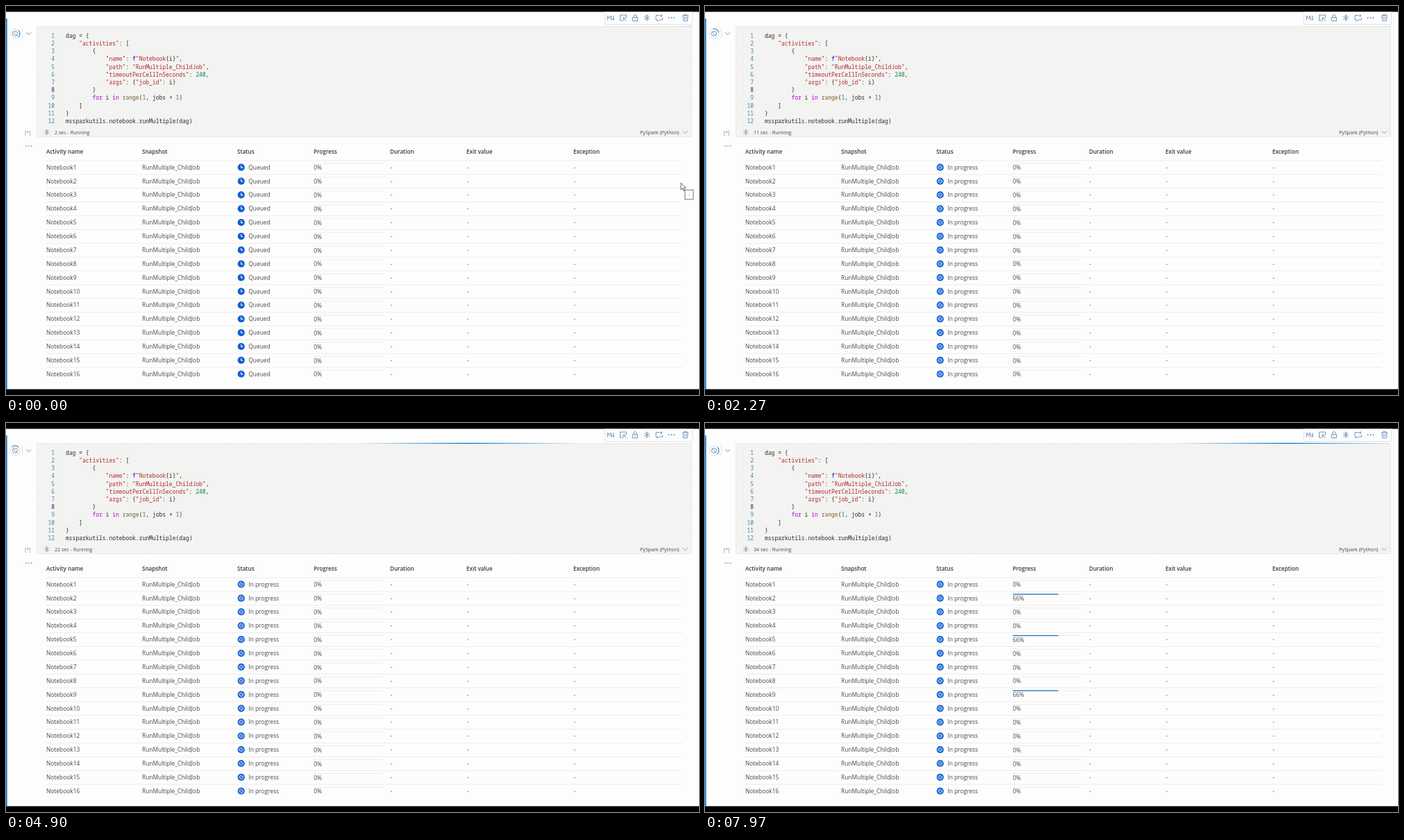
These frames come from a looping animation (998x561 px, 8000 ms). An HTML page:

```html
<!DOCTYPE html>
<html lang="en">
<head>
<meta charset="utf-8">
<title>Notebook run</title>
<style>
  html, body { margin: 0; width: 100%; height: 100%; overflow: hidden; background: #000; }
  svg { display: block; width: 100vw; height: 100vh; }
  text { font: 8.38px "Open Sans", "Noto Sans", sans-serif; fill: #4a4947; white-space: pre; }
  .head { font-size: 8.1px; font-weight: 600; fill: #3b3a39; }
  .small { font-size: 7.15px; }
  .faint { fill: #8a8886; }
  .code { font: 8px "Noto Sans Mono", "DejaVu Sans Mono", monospace; fill: #2a2a2a; }
  .num { fill: #3f86a0; text-anchor: end; }
  .num.current { fill: #0b216f; }
  .str { fill: #ab2a2a; }
  .kw { fill: #af00db; }
  .fn { fill: #795e26; }
  .lit { fill: #098658; }
  .pre { fill: #0000ff; }
  .icon { fill: none; stroke: #5f83ab; stroke-width: .85; }
  .grey { fill: none; stroke: #888; stroke-width: .8; }
</style>
</head>
<body>
<svg id="stage" viewBox="0 0 998 561" preserveAspectRatio="none">
  <defs>
    <linearGradient id="glow">
      <stop offset="0" stop-color="#0078d4" stop-opacity="0"/>
      <stop offset=".5" stop-color="#0078d4"/>
      <stop offset="1" stop-color="#0078d4" stop-opacity="0"/>
    </linearGradient>
    <clipPath id="cellTop"><rect x="44" y="28" width="944" height="3"/></clipPath>
    <g id="queuedIcon">
      <circle r="5.1" fill="#1160d0"/>
      <path d="M0-3V.4H2.6" fill="none" stroke="#fff" stroke-width="1.1"/>
    </g>
    <g id="activeIcon">
      <circle r="5.1" fill="#1160d0"/>
      <path d="M-1.7 2.2A2.8 2.8 0 0 1 .8-2.7M1.7-2.2A2.8 2.8 0 0 1-.8 2.7" fill="none" stroke="#fff" stroke-width=".9"/>
      <path d="M-.6-1.2H1V.4M.6 1.2H-1V-.4" fill="none" stroke="#fff" stroke-width=".5"/>
    </g>
    <path id="star" d="M0-4.5V4.5M-3.9-2.25L3.9 2.25M-3.9 2.25L3.9-2.25M-1.5-3.7L0-2.4L1.5-3.7M-1.5 3.7L0 2.4L1.5 3.7"/>
  </defs>

  <rect width="998" height="561" fill="#000"/>
  <rect y="8.4" width="998" height="544.2" fill="#fdfdfd"/>
  <rect y="18" width="1.7" height="534.6" fill="#1c80cf"/>

  <rect x="44.5" y="29.5" width="943" height="159" rx="2" fill="#f3f3f2" stroke="#d2d2d2" stroke-dasharray="1 1.5"/>
  <g clip-path="url(#cellTop)"><rect id="sweep" y="28.7" width="311" height="1.3" fill="url(#glow)"/></g>

  <path d="M862.5 8.4V26.5H988.5V8.4" fill="#fdfdfd" stroke="#e4e4e8"/>
  <g class="icon">
    <path d="M866.5 20.5V14L869 18L871.5 14V20.5M874.5 14V20M872.8 18.2L874.5 20.2L876.2 18.2"/>
    <path d="M889 21H884.5V13H893.5V17M889 17L893.5 21.5M889.2 20.5V17H892.7"/>
    <path d="M902.5 16.5H909.5V21.5H902.5ZM904 16.5V14.5A2 2 0 0 1 908 14.5V16.5M906 18.4V19.6"/>
    <use href="#star" x="923" y="17"/>
    <path d="M941 13.5H936V20H938V22L940.5 20H945.5V17M943.5 12V16M941.5 14H945.5"/>
    <path d="M974 14H983M976.5 14V12.5H980.5V14M975 14L975.6 21.5H981.4L982 14M977.4 16V19.5M979.6 16V19.5"/>
  </g>
  <g fill="#5f83ab">
    <circle cx="954.5" cy="17" r=".9"/><circle cx="958.5" cy="17" r=".9"/><circle cx="962.5" cy="17" r=".9"/>
  </g>

  <circle cx="13" cy="39.8" r="7" fill="none" stroke="#cfe0ef" stroke-width="1"/>
  <path id="spinner" d="M8.05 34.85A7 7 0 0 1 17.95 34.85" fill="none" stroke="#2b86cf" stroke-width="1.1"/>
  <circle cx="13" cy="39.8" r="3.6" class="icon"/>
  <path class="icon" d="M10.5 37.3L15.5 42.3"/>
  <path d="M23.5 32V47" stroke="#e2e2e2"/>
  <path class="icon" d="M29.2 38L32.7 41.5L36.2 38"/>

  <text class="small faint" x="27" y="184.6">[*]</text>
  <use href="#star" class="grey" transform="translate(58.8 182) scale(.9)"/>
  <text class="small" id="clock" x="70" y="184.8"></text>
  <text class="small" x="913" y="184.8">PySpark (Python)</text>
  <path class="grey" d="M974.7 180.3L978.2 183.8L981.7 180.3"/>
  <g fill="#666">
    <circle cx="29.2" cy="202" r=".8"/><circle cx="32.9" cy="202" r=".8"/><circle cx="36.6" cy="202" r=".8"/>
  </g>

  <g id="code"></g>
  <g id="table"></g>

  <g id="pointer">
    <path d="M972 255V265.2L974.3 263L976 266.7L977.5 266L975.9 262.4H979Z" fill="#fff" stroke="#444" stroke-width=".8"/>
    <rect x="977.8" y="265.3" width="12" height="13.6" fill="#fff" stroke="#666" stroke-width=".9"/>
    <text class="small" x="982.7" y="274.4">-</text>
  </g>
</svg>
<script>
const LOOP = 8000;
const STARTED = 900;      // queued jobs begin to run, pointer leaves
const ADVANCED = 7300;    // a few jobs report progress
const ROWS = 16, PITCH = 19.87;
const AHEAD = [2, 5, 9];
const $ = id => document.getElementById(id);

function add(parent, tag, attrs, content) {
  const el = document.createElementNS("http://www.w3.org/2000/svg", tag);
  for (const key in attrs) el.setAttribute(key, attrs[key]);
  if (content !== undefined) el.textContent = content;
  return parent.appendChild(el);
}

const source = `dag = {
    "activities": [
        {
            "name": f"Notebook{i}",
            "path": "RunMultiple_ChildJob",
            "timeoutPerCellInSeconds": 240,
            "args": {"job_id": i}
        }
        for i in range(1, jobs + 1)
    ]
}
mssparkutils.notebook.runMultiple(dag)`;

function tokenClass(token) {
  if (token.includes('"')) return "str";
  if (/^(for|in)$/.test(token)) return "kw";
  if (token === "range") return "fn";
  if (/^\d+$/.test(token)) return "lit";
  if (token === "f") return "pre";
  return "";
}

source.split("\n").forEach((line, i) => {
  const y = 45.9 + i * 11.18;
  add($("code"), "text", { class: "code num" + (i === 7 ? " current" : ""), x: 70, y }, i + 1);
  const indent = line.search(/\S/);
  const text = add($("code"), "text", { class: "code", x: 86 + indent * 4.8, y });
  const tokens = line.trim().match(/f(?=")|"Notebook(?=\{)|\{i\}|"(?=,)|"[^"]*"|\b\w+\b|[^\w"]+|./g);
  for (const token of tokens) add(text, "tspan", { class: tokenClass(token) }, token);
});

const table = $("table");
const columns = { "Activity name": 58, Snapshot: 196, Status: 333, Progress: 443, Duration: 553, "Exit value": 663, Exception: 817 };
for (const name in columns) add(table, "text", { class: "head", x: columns[name], y: 212.8 }, name);

const rows = Array.from({ length: ROWS }, (_, i) => {
  const y = 232.7 + i * PITCH;
  const label = (x, content, dy = 3) => add(table, "text", { x, y: y + dy }, content);
  add(table, "path", { d: `M58 ${y - 9.7}H974`, stroke: "#ececeb", "stroke-width": 1 });
  add(table, "path", { d: `M443 ${y - 5.6}H543`, stroke: "#ecebf1", "stroke-width": 1 });
  label(58, "Notebook" + (i + 1));
  label(196, "RunMultiple_ChildJob");
  for (const x of [553.5, 663.5, 817.5]) label(x, "-");
  return {
    ahead: AHEAD.includes(i + 1),
    icon: add(table, "use", { x: 338.7, y }),
    status: label(349.3, ""),
    percent: label(443.3, "", 3.7),
    bar: add(table, "rect", { x: 443.5, y: y - 6.3, height: 1.4, fill: "#2f7fc1" })
  };
});

// CSS "ease" curve, solved by bisection
function ease(x) {
  let lo = 0, hi = 1;
  const curve = (s, a, b) => 3 * a * s * (1 - s) ** 2 + 3 * b * s * s * (1 - s) + s ** 3;
  for (let i = 0; i < 20; i++) {
    const mid = (lo + hi) / 2;
    if (curve(mid, .25, .25) < x) lo = mid; else hi = mid;
  }
  return curve(lo, .1, 1);
}

function draw(t) {
  $("clock").textContent = `${Math.floor(2.38 + t * .00403)} sec - Running`;
  $("sweep").setAttribute("x", -239 + 1227 * ease((t / 749 + .81) % 1));
  $("spinner").setAttribute("transform", `rotate(${(t / 332 + .25) % 1 * 360} 13 39.8)`);
  const running = t >= STARTED;
  $("pointer").setAttribute("visibility", running ? "hidden" : "visible");
  for (const row of rows) {
    const done = row.ahead && t >= ADVANCED ? 66 : 0;
    row.icon.setAttribute("href", running ? "#activeIcon" : "#queuedIcon");
    row.status.textContent = running ? "In progress" : "Queued";
    row.percent.textContent = done + "%";
    row.bar.setAttribute("width", done * .99);
  }
}

const start = performance.now();
function tick() {
  draw((performance.now() - start) % LOOP);
  requestAnimationFrame(tick);
}
tick();
</script>
</body>
</html>
```
